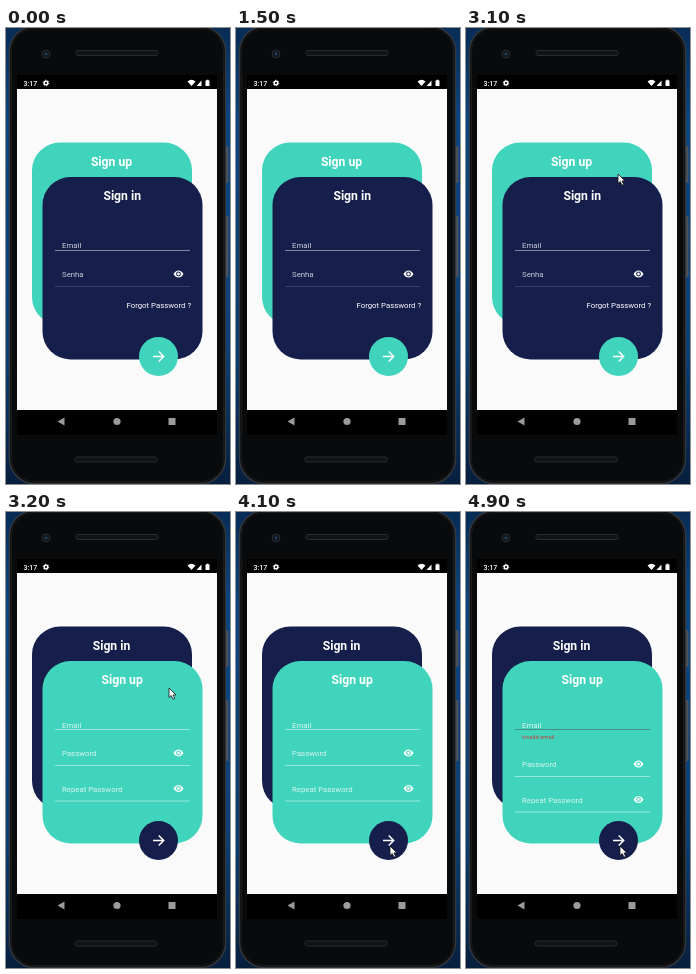
These frames come from a looping animation (224x456 px, 5000 ms). An HTML page:

```html
<!DOCTYPE html>
<html lang="en">
<head>
<meta charset="utf-8">
<title>Sign in / Sign up</title>
<style>
  html, body { margin: 0; width: 100%; height: 100%; overflow: hidden; background: #08294d; }
  svg { display: block; width: 224px; height: 456px; }
  text { font-family: Roboto, Arial, sans-serif; font-size: 7.8px; fill: #fff; }
  .title { font-size: 12.2px; font-weight: 700; text-anchor: middle; }
  .label { fill-opacity: .78; }
  .rule { stroke: #fff; stroke-width: 1; stroke-opacity: .45; }
  .navy { fill: #161f4b; }
  .teal { fill: #41d4bc; }
</style>
</head>
<body>
<svg viewBox="0 0 224 456">
  <defs>
    <linearGradient id="desk" x2="0" y2="1">
      <stop offset="0" stop-color="#082c55"/>
      <stop offset=".2" stop-color="#0b4684"/>
      <stop offset=".7" stop-color="#0a4179"/>
      <stop offset="1" stop-color="#071f3d"/>
    </linearGradient>
    <path id="eye" fill="#fff" fill-rule="evenodd"
      d="M-5 0Q-3 -3.5 0 -3.5T5 0Q3 3.5 0 3.5T-5 0ZM-2.4 0a2.4 2.4 0 1 0 4.8 0a2.4 2.4 0 1 0 -4.8 0ZM-1.4 0a1.4 1.4 0 1 0 2.8 0a1.4 1.4 0 1 0 -2.8 0Z"/>
  </defs>

  <rect width="224" height="456" fill="url(#desk)"/>
  <g fill="#4b535d">
    <rect x="218" y="118" width="4.5" height="37" rx="1.5"/>
    <rect x="218" y="188" width="4.5" height="61" rx="1.5"/>
  </g>
  <rect x="3.5" y="-1.5" width="216" height="457" rx="25" fill="#090a0b" stroke="#34383c" stroke-width="1.5"/>
  <rect x="5.5" y=".5" width="212" height="453" rx="23" fill="none" stroke="#191b1d"/>
  <g fill="#111214" stroke="#292b2d">
    <rect x="70" y="22.5" width="82" height="5" rx="2"/>
    <rect x="69" y="429" width="82" height="5" rx="2"/>
  </g>
  <circle cx="40" cy="26" r="4" fill="#10151d" stroke="#282b31"/>
  <circle cx="40" cy="26" r="1.4" fill="#29405f"/>

  <rect x="11" y="47" width="200" height="360" fill="#000"/>
  <rect x="11" y="61" width="200" height="321" fill="#fafafa"/>
  <text x="17.5" y="58" style="font-size:7px;font-weight:500">3:17</text>
  <circle cx="40" cy="55" r="1.8" fill="none" stroke="#fff" stroke-width="1.4"/>
  <circle cx="40" cy="55" r="2.8" fill="none" stroke="#fff" stroke-width="1" stroke-dasharray="1.3 1.63"/>
  <path d="M181.5 53.5Q185.5 50 189.500 53.5L185.500 58ZM190.500 58L195.500 52.500V58ZM199.500 52.500H200.500V51.800H202.500V52.500H203.500V58H199.500Z" fill="#fff"/>
  <g fill="#9b9b9b">
    <path d="M51.500 393.500L58.500 389.500V397.500Z"/>
    <circle cx="111" cy="393.500" r="3.600"/>
    <rect x="162.500" y="390" width="7" height="7"/>
  </g>

  <g id="app"></g>
  <path id="cursor" d="M0 0V9.500L2.200 7.500L4 11.200L5.700 10.400L4 6.900H7Z" fill="#fff" stroke="#111" stroke-width=".8"/>
</svg>
<script>
const LOOP = 5000, STEP = 100;
const SWAP = 3200, ERROR = 4800, SHIFT = 11;
// time, x, y of the pointer tip
const PATH = [
  [3000, 190, 142], [3100, 152, 146], [3200, 163, 176],
  [3500, 168, 300], [3700, 165, 342], [4000, 154, 334], [5000, 154, 334]
];
const app = document.getElementById('app');
const cursor = document.getElementById('cursor');

const card = (x, y, h, tone) =>
  `<rect x="${x}" y="${y}" width="160" height="${h}" rx="28" class="${tone}"/>`;
const title = (x, y, s) => `<text class="title" x="${x}" y="${y}">${s}</text>`;
const label = (y, s) => `<text class="label" x="56" y="${y}">${s}</text>`;
const rule = (y, style = '') => `<path class="rule" d="M49 ${y}H184" style="${style}"/>`;
const eye = y => `<use href="#eye" x="172.500" y="${y}"/>`;
const secret = (y, s) => label(y, s) + eye(y - 3) + rule(y + 9.5);

function scene(front, back, frontTone, backTone, fields) {
  return card(26, 114.5, 182.5, backTone) + title(105.5, 138, back) +
    card(36.5, 149, 182.5, frontTone) + title(116.2, 172, front) + fields +
    `<circle cx="152.500" cy="328.500" r="19.500" class="${backTone}"/>
     <path d="M147 328.500H157.500M152.700 323.500L157.700 328.500L152.700 333.500"
       fill="none" stroke="#fff" stroke-width="1.500"/>`;
}

const signIn = () => scene('Sign in', 'Sign up', 'navy', 'teal',
  label(220, 'Email') + rule(222.5) +
  label(249, 'Senha') + eye(246) + rule(258.5, 'stroke-opacity:.14') +
  '<text x="120.500" y="279.500">Forgot Password ?</text>');

function signUp(error) {
  const dy = error ? SHIFT : 0;
  const warning = error
    ? `<text x="56" y="227.300" style="font-size:5.800px;fill:#d32f2f" opacity="${error}">Invalid email</text>` : '';
  return scene('Sign up', 'Sign in', 'teal', 'navy',
    label(215.5, 'Email') + rule(217.5, error ? 'stroke:#4a8580;stroke-opacity:.9' : '') + warning +
    secret(244 + dy, 'Password') + secret(279.5 + dy, 'Repeat Password'));
}

function pointerAt(t) {
  const i = PATH.findIndex(p => p[0] > t);
  const [t0, x0, y0] = PATH[i - 1], [t1, x1, y1] = PATH[i];
  const k = (t - t0) / (t1 - t0);
  return [x0 + (x1 - x0) * k, y0 + (y1 - y0) * k];
}

let shown = '';
function draw(now) {
  const t = Math.floor(now % LOOP / STEP) * STEP;
  const error = t < ERROR ? 0 : t === ERROR ? .4 : .9;
  const key = `${t >= SWAP} ${error}`;
  if (key !== shown) {
    app.innerHTML = t < SWAP ? signIn() : signUp(error);
    shown = key;
  }
  const visible = t >= PATH[0][0];
  cursor.style.display = visible ? '' : 'none';
  if (visible) cursor.setAttribute('transform', `translate(${pointerAt(t)})`);
}

const start = performance.now();
function tick() {
  draw(performance.now() - start);
  requestAnimationFrame(tick);
}
tick();
</script>
</body>
</html>
```
